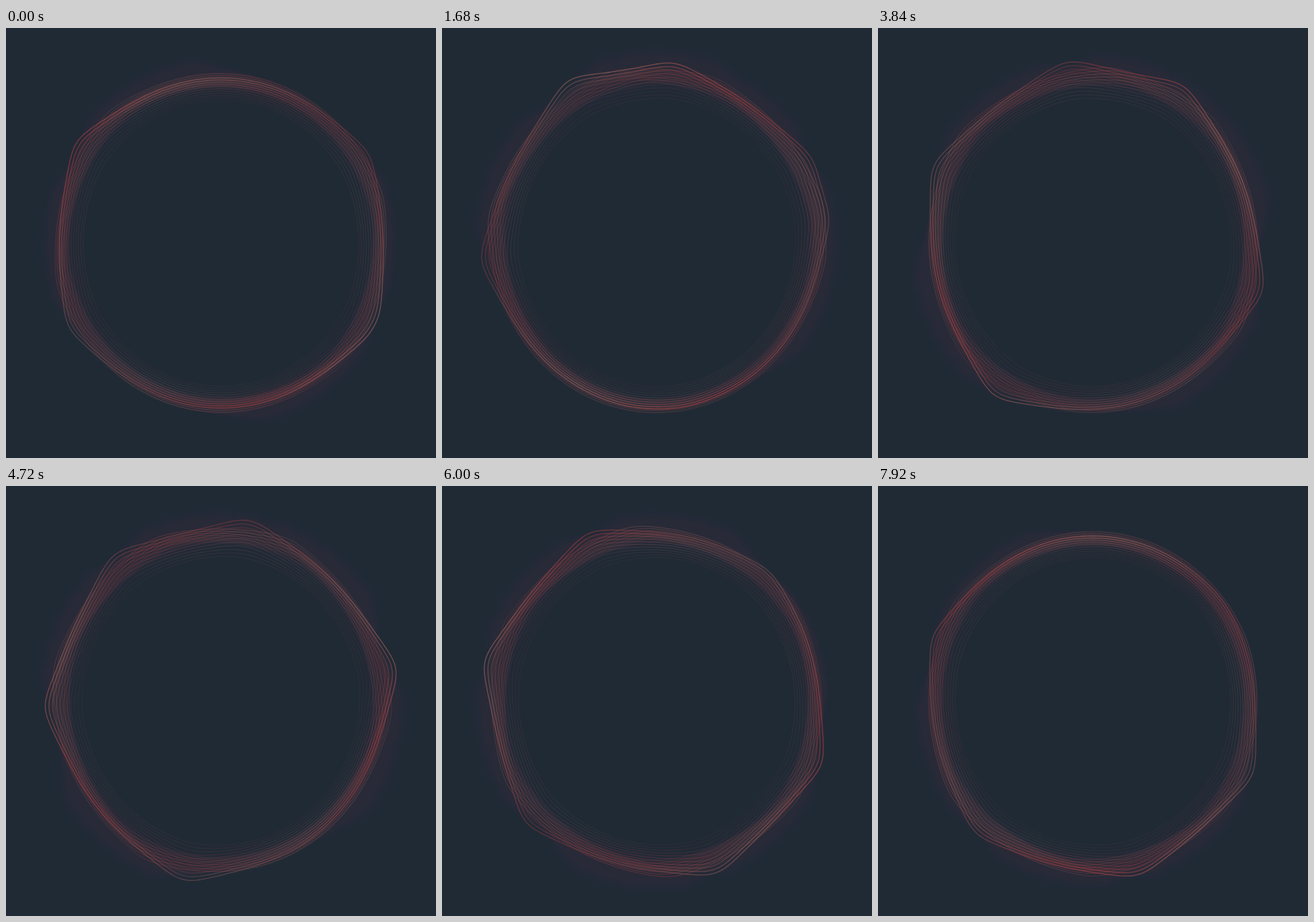
Write an HTML page with a canvas that moves like this. It is 600x600 px and loops after 8 s.

```html
<!DOCTYPE html>
<html lang="en">
<head>
<meta charset="utf-8">
<title>Drifting ring</title>
<style>
html, body { margin: 0; width: 100%; height: 100%; overflow: hidden; background: #202a35; }
canvas { display: block; width: 100vmin; height: 100vmin; }
</style>
</head>
<body>
<canvas id="stage" width="600" height="600"></canvas>
<script>
const LOOP = 8000, STEP = 80, SIZE = 600, MID = 300;
const SPIN = -30; // degrees per second, counter-clockwise
const TAU = Math.PI * 2;

// Crests ride on the turning ring: start angle, own drift (deg/s),
// height, and the second at which they peak with the span of their life.
const crests = [
  { at: 25, drift: -2, high: 24, peak: 5, span: 6 },
  { at: 32, drift: 6, high: 24, peak: 5, span: 5 },
  { at: 215, drift: 6, high: 25, peak: 4, span: 9 },
  { at: 329, drift: -2, high: 23, peak: 5, span: 8 },
  { at: 151, drift: 0, high: 18, peak: 0, span: 1 },
  { at: 131, drift: 0, high: 26, peak: 4.5, span: 1.7 },
  { at: 201, drift: 0, high: 28, peak: 6.5, span: 1 },
  { at: 292, drift: 0, high: 28, peak: 1.6, span: 0.7 }
];

const ctx = document.getElementById("stage").getContext("2d");
const mix = (a, b, w) => a + (b - a) * w;
const wrap = (n, m) => ((n % m) + m) % m;
const bell = x => Math.exp(-x * x);
const degrees = Array.from({ length: 360 }, (_, d) => d);

// Rounded peak with straight-looking flanks.
const peakShape = d => Math.exp(-(Math.hypot(d, 6) - 6) / 11);

// The ring without crests is slightly taller than wide.
const base = degrees.map(d => 226 - 4 * Math.cos(2 * d / 360 * TAU));

function waveAt(sec) {
  const live = crests.map(c => ({
    angle: c.at + (c.drift + SPIN) * sec,
    height: c.high * bell((sec - c.peak) / c.span)
  }));
  return degrees.map(d => live.reduce((sum, c) =>
    sum + c.height * peakShape(wrap(d - c.angle + 180, 360) - 180), 0));
}

function addRing(radius) {
  for (const d of degrees) {
    const a = d / 360 * TAU, r = radius(d);
    const x = MID + r * Math.cos(a), y = MID + r * Math.sin(a);
    if (d) ctx.lineTo(x, y); else ctx.moveTo(x, y);
  }
  ctx.closePath();
}

function strokeRing(radius, style, width) {
  ctx.beginPath();
  addRing(radius);
  ctx.strokeStyle = style;
  ctx.lineWidth = width;
  ctx.stroke();
}

// Red to dusty brown around the ring, with brighter and dimmer stretches.
function tint(alpha, phase) {
  const g = ctx.createConicGradient(0, MID, MID);
  for (let i = 0; i <= 24; i++) {
    const a = i / 24 * TAU;
    const brown = 0.5 + 0.5 * Math.sin(3 * a + phase);
    const light = 0.78 + 0.22 * Math.sin(2 * a - phase * 1.3);
    const rgb = [mix(172, 152, brown), mix(58, 100, brown), mix(62, 92, brown)].map(Math.round);
    g.addColorStop(i / 24, `rgba(${rgb},${(alpha * light).toFixed(3)})`);
  }
  return g;
}

function draw(t) {
  const sec = t / 1000, phase = sec * 0.7;
  const wave = waveAt(sec);
  const lag = (d, by) => wave[wrap(d - by, 360)];
  const trail = degrees.map(d => 1.5 * Math.max(...[12, 20, 28, 36, 44].map(by => lag(d, by))));
  ctx.fillStyle = "#202a35";
  ctx.fillRect(0, 0, SIZE, SIZE);

  // Soft lobes where the crests have just been.
  for (let k = 1; k <= 8; k++) {
    ctx.beginPath();
    addRing(d => base[d] + 2 + trail[d] * (0.6 + k * 0.05));
    addRing(d => base[d] - 2 * k);
    ctx.fillStyle = "rgba(92,48,72,0.026)";
    ctx.fill("evenodd");
  }

  // Dense glow and flatter strands that lag behind the crests.
  for (let k = 0; k < 6; k++) {
    strokeRing(d => base[d] + 4 + 0.4 * lag(d, 4 * k) - k * 3, tint(0.05, phase + k * 0.4), 7);
  }
  for (let k = 0; k < 7; k++) {
    strokeRing(d => base[d] + 6 + (0.4 - 0.04 * k) * lag(d, 14 + 2 * k) - k * 2.8,
      tint(0.4 - k * 0.03, phase + 2 + k * 0.5), 1);
  }

  // Nested lines: wider apart on crests, tighter in hollows, fading inwards.
  for (let k = 10; k >= 0; k--) {
    strokeRing(d => base[d] + (1 - 0.09 * k) * wave[d] - 3 * k,
      tint(0.68 * Math.exp(-k * 0.17), phase + k * 0.35), k < 2 ? 1.3 : 1);
  }
}

let shown = -1;
function tick() {
  const t = Math.floor((performance.now() % LOOP) / STEP) * STEP;
  if (t !== shown) draw(shown = t);
  requestAnimationFrame(tick);
}
tick();
</script>
</body>
</html>
```
